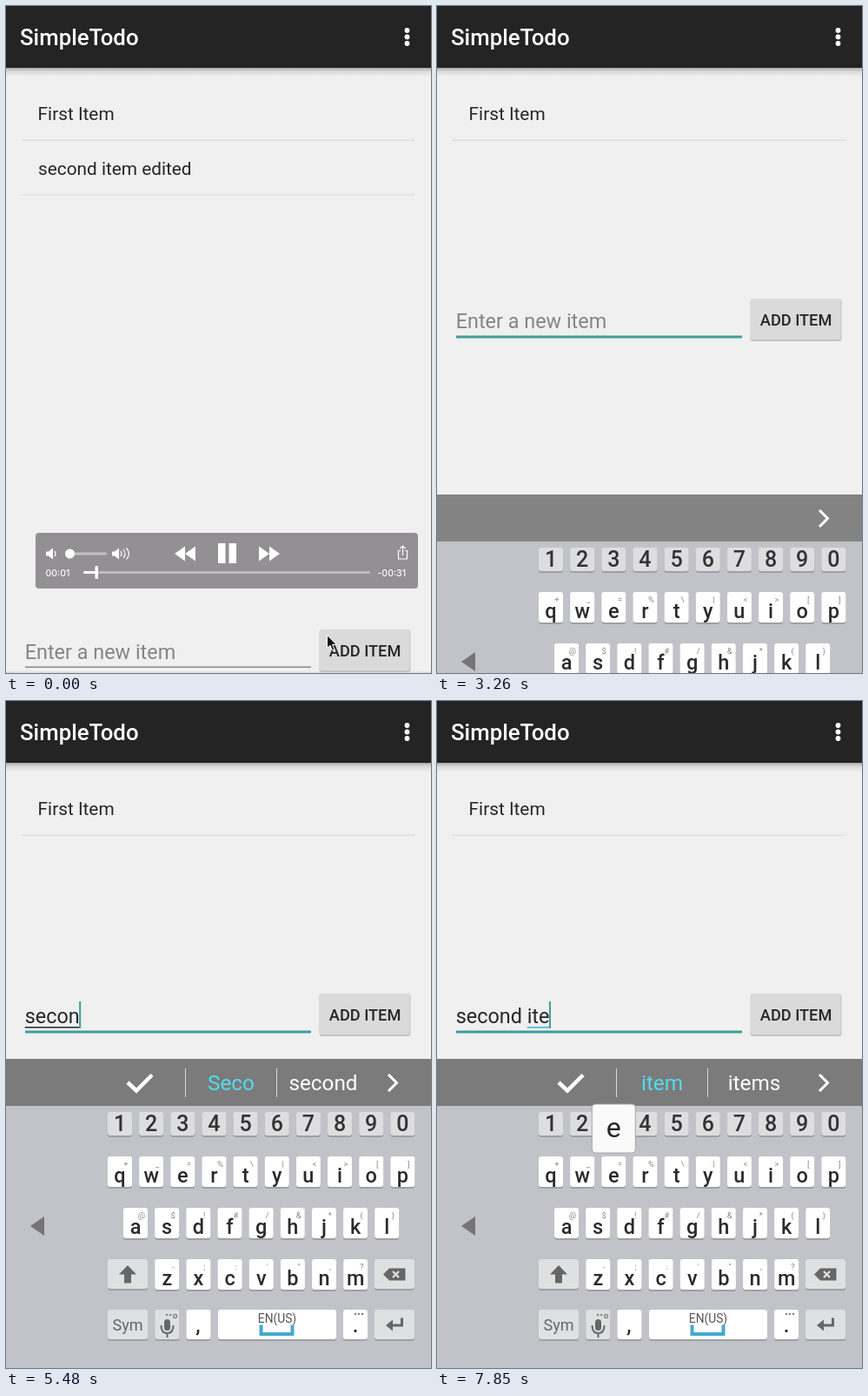
Write an HTML page that moves like this. It is 489 by 766 pixels and loops after 8000 ms.

```html
<!DOCTYPE html>
<html lang="en">
<head>
<meta charset="utf-8">
<title>Todo list</title>
<style>
  html, body { margin: 0; width: 100%; height: 100%; overflow: hidden; background: #f0f0f0; }
  svg { display: block; width: 100%; height: 100%; }
  text { font-family: Roboto, sans-serif; fill: #262626; white-space: pre; }
  .mid { text-anchor: middle; }
  .line { fill: none; stroke-width: 3; }
</style>
</head>
<body>
<svg viewBox="0 0 489 766">
  <defs>
    <linearGradient id="shade" x2="0" y2="1">
      <stop stop-color="#aaa"/><stop offset=".4" stop-color="#d8d8d8"/><stop offset="1" stop-color="#f0f0f0"/>
    </linearGradient>
    <clipPath id="row"><rect x="17" y="155" width="453" height="61"/></clipPath>
  </defs>
  <rect width="489" height="766" fill="#f0f0f0"/>
  <rect y="71" width="489" height="10" fill="url(#shade)"/>
  <rect width="489" height="71" fill="#242424"/>
  <text x="16" y="45" font-size="25.8" font-weight="500" style="fill:#fff">SimpleTodo</text>
  <g fill="#fff"><circle cx="461.5" cy="28" r="2.9"/><circle cx="461.5" cy="35.5" r="2.9"/><circle cx="461.5" cy="43" r="2.9"/></g>

  <text x="36.6" y="131" font-size="20.8">First Item</text>
  <rect x="17" y="153.5" width="453" height="1.5" fill="#dfdfdf"/>
  <g id="second">
    <text x="37" y="194" font-size="20.8">second item edited</text>
    <rect x="17" y="216" width="453" height="1.5" fill="#e2e2e2"/>
  </g>
  <circle id="ripple" cx="232" cy="186" clip-path="url(#row)"/>
  <rect y="764.5" width="489" height="1.5" fill="#dedede"/>

  <g id="form">
    <text id="entry" x="21.7" y="750" font-size="23.4"></text>
    <rect id="composing" y="754" height="1.6"/>
    <rect id="caret" y="725" width="2" height="31" fill="#3f9f98"/>
    <rect id="underline" x="22" width="329"/>
    <rect x="360.5" y="716.5" width="105" height="48.5" rx="3" fill="#c4c4c4"/>
    <rect x="361" y="716" width="103.5" height="47" rx="2" fill="#dadada"/>
    <text x="371.8" y="747" font-size="18.2" font-weight="500">ADD ITEM</text>
  </g>

  <g id="player" fill="#fff">
    <rect x="34" y="605" width="440" height="64" rx="4" fill="#929092"/>
    <path d="M46 626.500h3l5-4v13l-5-4h-3zM122 626.500h3l5-4v13l-5-4h-3z"/>
    <path class="line" style="stroke-width:1.2" stroke="#fff" d="M56 626q2 3 0 6M132 626q2 3 0 6M135 624q4 5 0 10M138.500 622.500q6 6.500 0 13"/>
    <rect x="73" y="627.500" width="43" height="3" rx="1.500" fill="#c4c2c4"/>
    <circle cx="73.500" cy="629" r="5.500"/>
    <path d="M194 629l12-8.500v17zM206 629l12-8.500v17zM303 629l-12-8.500v17zM315 629l-12-8.500v17zM244 617h8.500v23h-8.500zM256.500 617h8.500v23h-8.500z"/>
    <path class="line" style="stroke-width:1.2" stroke="#fff" d="M454 625.500h-2.500v9.500h10v-9.500h-2.500M456.500 631v-10.500M453.500 623l3-3 3 3"/>
    <rect x="89" y="649" width="330" height="3" rx="1.500" fill="#bdbbbd"/>
    <rect x="89" y="649" width="15" height="3" rx="1.500"/>
    <rect x="102.500" y="643" width="3.500" height="15" rx="1"/>
    <g font-size="10.5" font-weight="500">
      <text x="45.500" y="655" style="font-family:Inter,sans-serif;fill:#fff">00:01</text>
      <text x="427.500" y="655" style="font-family:Inter,sans-serif;fill:#fff">-00:31</text>
    </g>
  </g>
  <path id="pointer" d="M369.500 722.500v15l3.500-3.200 2.500 5.700 2.500-1.100-2.500-5.500h4.700z" fill="#111" stroke="#fff"/>

  <g id="keyboard">
    <rect id="strip" y="411" width="489" height="55"/>
    <rect y="465" width="489" height="301" fill="#c2c3c9"/>
    <path d="M440 429l9.500 9.500-9.500 9.500" class="line" stroke="#fff"/>
    <path d="M28 603l16-11v22z" fill="#757575"/>
    <g id="words">
      <path d="M206.500 422v33M311.500 422v33" stroke="#d8d8d8"/>
      <path id="check" d="M140 438l10 9.500 18-18" class="line" style="stroke-width:4.5" stroke="#fff"/>
      <text class="mid" x="154" y="447"></text>
      <text class="mid" x="259" y="447"></text>
      <text class="mid" x="365" y="447"></text>
    </g>
    <g id="keys"></g>
    <g fill="#666">
      <path d="M140 648l10 10.500h-6v10h-8v-10h-6z"/>
      <path d="M434 658.500l7-7h18.500v14h-18.500z"/>
      <path d="M445 655l7 7M452 655l-7 7" stroke="#e4e4e6" stroke-width="2.200"/>
      <path d="M437 717l8-6.500v13zM444 715.500h10v-7h3v10h-13z"/>
      <rect x="182" y="710" width="7" height="13" rx="3.500"/>
      <path d="M178.500 717q0 9 7 9t7-9M185.500 726v5" class="line" stroke="#666" style="stroke-width:2"/>
      <g fill="#888"><circle cx="185" cy="705" r="1.300"/><circle cx="189" cy="705" r="1.300"/><circle cx="402" cy="704" r="1.300"/><circle cx="406" cy="704" r="1.300"/><circle cx="410" cy="704" r="1.300"/></g>
      <circle cx="194.500" cy="706.500" r="2" fill="none" stroke="#888" stroke-width="1.500"/>
    </g>
    <text class="mid" x="140" y="723" font-size="18" style="fill:#666">Sym</text>
    <text class="mid" x="312" y="714" font-size="13.8" style="fill:#555">EN(US)</text>
    <path id="bracket" d="M293.500 716.500v10.500h36v-10.500" class="line" style="stroke-width:4"/>
    <g id="popup">
      <rect x="-25" y="-60" width="50" height="56" rx="4" fill="#fafafa" stroke="#a5a6ab"/>
      <text class="mid" y="-22" font-size="32"></text>
    </g>
  </g>
</svg>
<script>
const LOOP = 8000, PITCH = 36.15, ENTRY_X = 21.7;
const $ = id => document.getElementById(id);
const set = (el, attrs) => { for (const k in attrs) el.setAttribute(k, attrs[k]); };
const show = (el, on) => { el.style.display = on ? '' : 'none'; };

// Keyboard
const keyPlaces = {};
let keyMarkup = '';
function addKey(x, y, w, h, fill, id = '') {
  keyMarkup += `<rect x="${x}" y="${y + 2}" width="${w}" height="${h}" rx="3" fill="#9fa0a5"/>
    <rect ${id && `id="${id}"`} x="${x}" y="${y}" width="${w}" height="${h}" rx="3" fill="${fill}"/>`;
}
function addLabel(char, x, y, size, fill, weight = 400) {
  const safe = char.replace('&', '&amp;').replace('<', '&lt;');
  keyMarkup += `<text class="mid" x="${x}" y="${y}" font-size="${size}" font-weight="${weight}" style="fill:${fill}">${safe}</text>`;
}
function addRow(chars, hints, left, top) {
  [...chars].forEach((char, i) => {
    const x = left + i * PITCH;
    addKey(x, top, 28, 35, '#fff');
    addLabel(char, x + 14, top + 29.5, 23.5, '#2b2b2b', 500);
    addLabel(hints[i], x + 21, top + 12, 9.5, '#888');
    keyPlaces[char] = [x + 14, top];
  });
}
[...'1234567890'].forEach((digit, i) => {
  const x = 117 + i * PITCH;
  addKey(x, 472, 28, 27, '#dedee0');
  addLabel(digit, x + 14, 494, 25, '#333', 500);
});
addRow('qwertyuiop', '+_=%\\|<>[]', 117, 523);
addRow('asdfghjkl', '@$!#/&*()', 135, 582);
addRow('zxcvbnm', '-;:\'",?', 171.300, 641);
for (const [x, y] of [[117, 641], [424, 641], [117, 699], [424, 699]]) addKey(x, y, 46, 34, '#dfe0e2');
addKey(171.300, 699, 28, 34, '#dfe0e2');
addKey(207.500, 699, 28, 34, '#fff');
addKey(244, 699, 136, 34, '#fff', 'space');
addKey(388, 699, 28, 34, '#fff');
addLabel(',', 221, 725, 24, '#2b2b2b', 500);
addLabel('.', 402, 725, 24, '#2b2b2b', 500);
$('keys').innerHTML = keyMarkup;

// Timeline
const TAP = 150;
const typed = [[4000, 's'], [4290, 'e'], [4580, 'c'], [5030, 'o'], [5330, 'n'], [5630, 'd'],
  [6370, ' '], [6970, 'i'], [7420, 't'], [7710, 'e']];
// An empty first word stands for the tick that accepts the correction.
const suggestions = [[4290, 'so', 's', 'see'], [4730, 'selenium', 'se', 'send'], [5180, 'section', 'sec', 'second'],
  [5480, '', 'Seco', 'second'], [6070, 'secondly', 'second', 'seconds'],
  [7270, 'it', 'i', 'in'], [7850, '', 'item', 'items']];
const wordSize = { selenium: 20.3, secondly: 20.8, seconds: 21.8 };
const latest = (list, t) => list.filter(item => item[0] <= t).pop();

const pen = document.createElement('canvas').getContext('2d');
function widthOf(text) {
  pen.font = '23.4px Roboto, sans-serif';
  return pen.measureText(text).width;
}

function drawList(t) {
  const fade = [150, 300, 440, 590].filter(time => time <= t).length;
  $('player').setAttribute('opacity', 1 - fade / 4);
  show($('pointer'), t < 150);
  show($('second'), t < 1480);
  show($('ripple'), t >= 1030 && t < 1770);
  const step = Math.min(3, Math.floor((t - 1030) / 150));
  set($('ripple'), { r: 30 + 19 * step, opacity: step < 3 ? 0.1 : 0.05 });
}

function drawForm(t, text) {
  const focused = t >= 2820, raised = t >= 3260;
  set($('form'), { transform: `translate(0 ${raised ? -380 : 0})` });
  $('entry').textContent = text || 'Enter a new item';
  $('entry').style.fill = text ? '#262626' : '#858585';
  set($('underline'), focused ? { y: 758.500, height: 3, fill: t < 2960 ? '#6fada8' : '#3f9f98' }
                              : { y: 758.500, height: 1.500, fill: '#8c8c8c' });
  const end = ENTRY_X + widthOf(text);
  $('caret').setAttribute('x', end - 0.5);
  show($('caret'), (focused && !raised) || (t >= 3550 && t < 3850) || t >= 4000);

  const start = text.lastIndexOf(' ') + 1;
  const left = ENTRY_X + widthOf(text.slice(0, start));
  set($('composing'), { x: left, width: end - left, fill: start ? '#49b4cf' : '#333' });
}

function drawKeyboard(t, tap) {
  show($('keyboard'), t >= 3260);
  set($('keyboard'), { transform: `translate(0 ${t < 3400 ? 150 : 0})` });

  const words = latest(suggestions, t);
  const correcting = !!words && !words[1];
  show($('words'), words);
  $('strip').setAttribute('fill', words ? '#7b7b7b' : '#838383');
  show($('check'), correcting);
  $('words').querySelectorAll('text').forEach((el, i) => {
    const word = words ? words[i + 1] : '';
    el.textContent = word;
    el.setAttribute('font-size', wordSize[word] || 24.3);
    el.style.fill = correcting && i === 1 ? '#52dcf0' : '#fff';
  });
  $('bracket').setAttribute('stroke', correcting ? '#45a9d0' : '#555');

  const pressed = tap && t < tap[0] + TAP ? tap[1] : '';
  $('space').setAttribute('fill', pressed === ' ' ? '#d4d5d9' : '#fff');
  const place = keyPlaces[pressed];
  show($('popup'), place);
  if (place) {
    set($('popup'), { transform: `translate(${place})` });
    $('popup').lastElementChild.textContent = pressed;
  }
}

function draw(now) {
  const t = now % LOOP;
  const text = typed.filter(([time]) => time <= t).map(([, char]) => char).join('');
  drawList(t);
  drawForm(t, text);
  drawKeyboard(t, latest(typed, t));
}

const began = performance.now();
function tick() {
  draw(performance.now() - began);
  requestAnimationFrame(tick);
}
tick();
</script>
</body>
</html>
```
